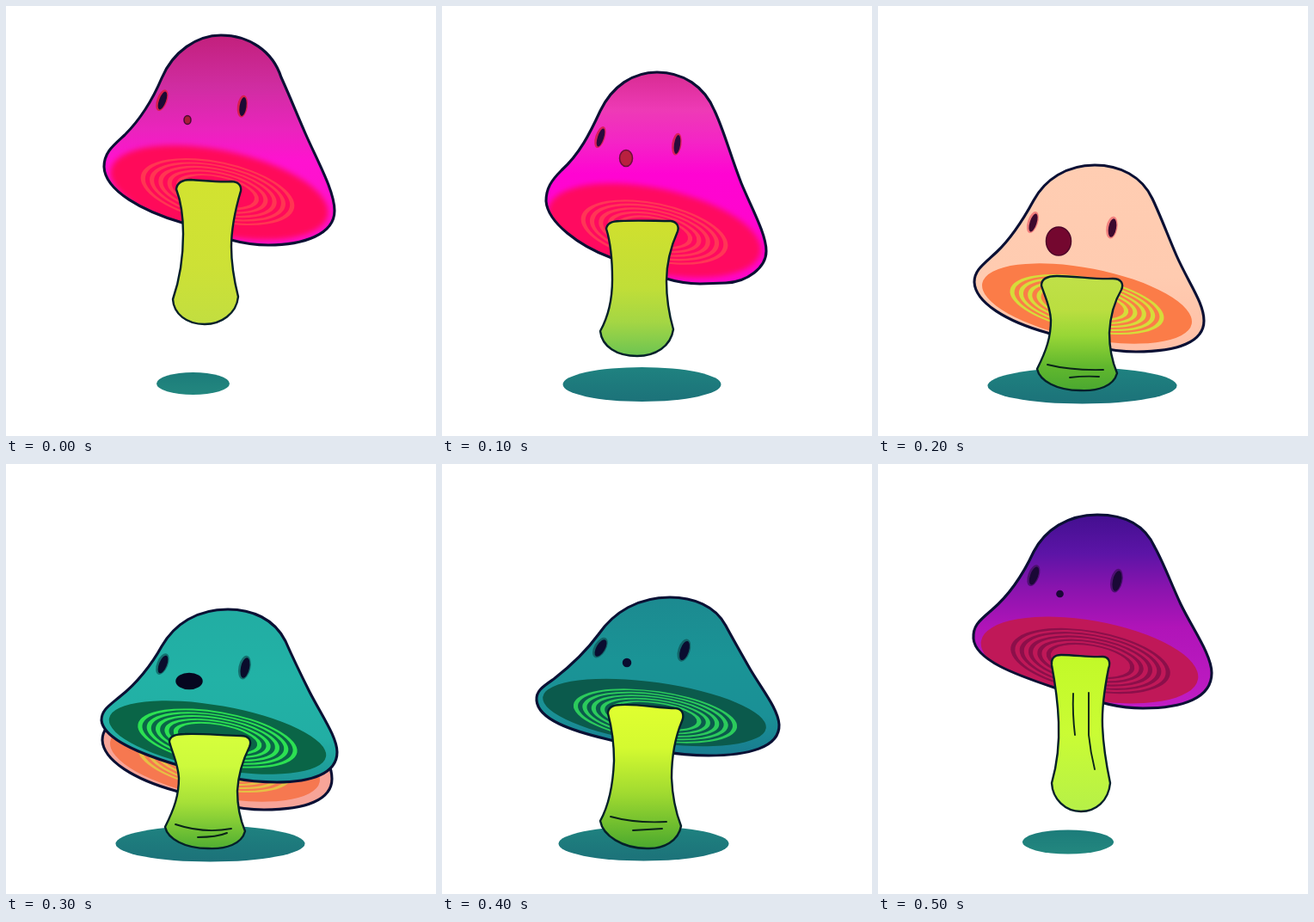
Animation, 500 px wide and 500 px high, one loop 0.6 s. Source, as an HTML page:

```html
<!DOCTYPE html>
<html lang="en">
<head>
<meta charset="utf-8">
<title>Bouncing mushroom</title>
<style>
html, body { margin: 0; width: 100%; height: 100%; overflow: hidden; background: #fff; }
svg { display: block; width: 100vw; height: 100vh; }
.pose { visibility: hidden; animation: show 600ms step-end infinite; animation-delay: calc(var(--i) * 100ms - 600ms); }
@keyframes show {
  0% { visibility: visible; }
  16.6667%, 100% { visibility: hidden; }
}
.line { fill: none; stroke: #0a1034; stroke-linejoin: round; stroke-linecap: round; }
.soft { filter: blur(3px); }
</style>
</head>
<body>
<svg id="stage" viewBox="0 0 500 500">
  <defs>
    <linearGradient id="ground" x1="0" y1="0" x2="0" y2="1">
      <stop offset="0" stop-color="#1c7c7a"/>
      <stop offset="1" stop-color="#23877f"/>
    </linearGradient>
    <linearGradient id="groundWide" x1="0" y1="0" x2="0" y2="1">
      <stop offset="0" stop-color="#1f8280"/>
      <stop offset="1" stop-color="#1c7279"/>
    </linearGradient>
  </defs>
</svg>
<script>
// eye: [x, y, rx, ry, tilt]; mouth: [x, y, rx, ry]; gill: [x, y, rx, ry, tilt]; rings: [x, y, rx, ry]
const poses = [
  {
    cap: 'M250 34C222 34 194 53 181 84C170 110 155 133 138 150C125 162 114 170 114 187C115 215 160 239 205 252C245 267 270 278 305 278C345 278 382 266 382 238C382 215 362 180 348 148C335 118 330 105 320 83C310 52 282 34 250 34Z',
    skin: ['#c2207c', '#d02da2 25%', '#ea24bd 45%', '#ff12d0 60%', '#ff10c8'],
    gill: [248, 217, 129, 49, 12], soft: true, under: '#ff0a5a',
    rings: [246, 216, 91, 35], ring: '#ff3652',
    eyes: [[182, 110, 4, 11, 20], [275.5, 117, 4, 11, 8]], halo: '#d81f4c', pupil: '#1b0a34',
    mouth: [211, 132.5, 4, 5], lips: '#a81c38', lipLine: '#4a0c34',
    stem: 'M198 213C199 205 206 202 215 202C232 203 248 205 262 204C270 204 274 209 273 215C268 232 262 255 262 280C262 302 266 322 270 338C268 358 250 370 231 370C210 370 195 358 194 341C203 315 206 290 206 265C206 245 203 226 198 213Z',
    flesh: ['#d2e330', '#cde136 60%', '#c2de40'],
    shadow: [217.5, 439, 42.5, 13]
  },
  {
    cap: 'M250 77C222 77 198 93 184 122C172 148 160 172 139 191C127 203 121 212 121 227C123 252 160 279 195 292C235 308 265 323 300 323L330 322C355 321 377 304 377 285C377 265 360 235 348 206C335 173 328 145 317 122C305 93 280 77 250 77Z',
    skin: ['#d82c92', '#ee3ab6 18%', '#f424c6 33%', '#ff04d2 48%', '#ff06c8'],
    gill: [247, 261, 126, 49, 12], soft: true, under: '#ff0a60',
    rings: [247, 263, 87, 34], ring: '#ff3656',
    eyes: [[184.5, 153, 3.6, 11, 18], [273.5, 161, 3.6, 11, 8]], halo: '#d81f58', pupil: '#2a0a3c',
    mouth: [214, 177, 7.5, 9.5], lips: '#b9203f', lipLine: '#6a1038',
    stem: 'M191 259C192 252 198 250 207 250C228 249 248 250 266 250C273 251 276 256 274 262C266 280 261 300 261 320C261 342 265 362 269 376C266 396 248 407 227 407C203 407 186 396 184 378C194 360 198 340 198 318C198 295 196 275 191 259Z',
    flesh: ['#d0e02e', '#c0de38 50%', '#a4d644 75%', '#6cc452'],
    shadow: [232.5, 440, 92, 20], wide: true
  },
  {
    cap: 'M252 185C219 185 194 202 181 226C169 248 155 270 138 286C123 300 112 307 112 321C113 345 150 367 197 380C235 392 265 402 300 402C350 402 379 390 379 366C379 345 361 322 347 290C337 267 329 245 319 224C307 198 281 185 252 185Z',
    skin: ['#ffcdb2', '#ffcbb0 60%', '#ffbfa6'],
    gill: [243, 346, 124, 41, 11], under: '#fb7c48',
    rings: [243, 347, 91, 31], ring: '#d6dc3a',
    eyes: [[180.5, 252, 4, 11, 18], [272.5, 258, 4.5, 11, 10]], halo: '#f2807e', pupil: '#3c0a2e',
    mouth: [210, 273.5, 14.5, 16.5], lips: '#74072f', lipLine: '#4e0428',
    stem: 'M190 325C190 317 198 314 208 314C230 314 252 318 273 317C283 317 286 323 283 330C274 345 270 362 269 380C269 400 273 415 278 427C274 442 256 448 235 447C208 447 188 436 185 422C196 400 201 385 201 365C200 348 194 338 190 325Z',
    flesh: ['#c0e048', '#bade40 30%', '#98d636 52%', '#62b82e 78%', '#4aa830'],
    folds: 'M197 417Q225 424 262 423M223 432Q240 430 257 431',
    shadow: [237.5, 441.5, 110, 21], wide: true
  },
  {
    cap: 'M258 169C222 169 196 186 181 212C169 234 151 256 133 270C120 281 111 286 111 298C113 318 150 335 196 349C235 361 275 370 315 370C355 370 385 360 385 335C385 318 368 294 353 265C342 243 332 222 325 206C312 180 286 169 258 169Z',
    skin: ['#22ada3', '#22b2a6 40%', '#22aea4 75%', '#1c9696'],
    gill: [246, 318, 128, 37, 10], under: '#0a6547',
    rings: [246, 319, 94, 31], ring: '#2ce052',
    eyes: [[182.5, 233, 4.5, 11, 22], [278, 237, 5, 12, 12]], halo: '#14706f', pupil: '#0a0c2c',
    mouth: [213, 252.5, 15, 9], lips: '#06061f', lipLine: '#06061f',
    stem: 'M190 323C190 316 198 314 208 314C230 313 252 316 273 316C283 316 286 322 283 329C275 345 270 362 269 380C269 400 273 415 278 427C274 442 256 448 235 447C208 447 188 436 185 422C196 400 201 385 201 365C200 348 194 338 190 323Z',
    flesh: ['#d6ff3c', '#cdfa3c 28%', '#a6e038 60%', '#50ae32'],
    folds: 'M197 419Q230 430 262 424M223 434Q245 434 257 429',
    shadow: [237.5, 441.5, 110, 21], wide: true, trail: 2
  },
  {
    cap: 'M265 155C228 155 200 172 182 198C166 220 148 236 130 250C117 259 109 264 110 275C112 297 150 310 192 320C235 331 270 339 310 339C355 339 393 330 392 303C391 285 372 262 358 238C346 217 338 203 330 188C318 165 292 155 265 155Z',
    skin: ['#1c8a90', '#1a9496 40%', '#1a9096 75%', '#187c90'],
    gill: [247, 289, 131, 35, 8], under: '#0b5a4c',
    rings: [248, 293, 96, 29], ring: '#2bca5c',
    eyes: [[184.5, 214, 5, 11, 30], [282, 217, 5, 11.5, 18]], halo: '#126468', pupil: '#0a0c30',
    mouth: [215, 231, 4.5, 4.5], lips: '#0a0c30', lipLine: '#0a0c30',
    stem: 'M193 290C193 282 200 280 208 280C230 279 252 284 272 284C280 285 282 292 279 299C271 318 267 342 267 365C268 390 273 408 278 421C275 438 258 448 238 447C210 447 187 432 184 415C195 395 199 370 200 345C200 322 197 305 193 290Z',
    flesh: ['#e0ff30', '#d4fa30 30%', '#a0da30 62%', '#4aa82e'],
    folds: 'M196 410Q225 418 261 416M222 426L256 424',
    shadow: [234.5, 441.5, 99, 20], wide: true
  },
  {
    cap: 'M255 59C220 59 194 77 181 102C168 130 152 153 132 170C118 182 110 188 111 203C113 228 160 245 205 260C245 272 270 284 308 284C355 284 388 272 388 243C388 222 366 192 352 163C340 137 332 115 322 97C310 70 285 59 255 59Z',
    skin: ['#430f90', '#5c14a6 20%', '#8a14ae 38%', '#b014b8 58%', '#c01cc4'],
    gill: [246, 228, 128, 46, 10], under: '#c01858',
    rings: [247, 229, 94, 35], ring: '#8c0f4a',
    eyes: [[181.5, 130, 4.5, 11, 20], [278, 136, 5, 12, 12]], halo: '#4c1070', pupil: '#1a0836',
    mouth: [211.5, 151, 3.6, 3.6], lips: '#1a0836', lipLine: '#1a0836',
    stem: 'M202 234C201 225 206 222 213 222C230 222 246 225 261 224C268 224 271 230 268 238C264 258 260 280 261 305C262 330 266 352 270 371C268 392 253 404 236 404C218 404 203 390 202 371C208 350 211 325 210 300C209 275 206 255 202 234Z',
    flesh: ['#c2f928', '#cafc34 50%', '#b6f048'],
    folds: 'M227 267Q226 290 229 315M245 266L245 315Q247 335 252 355',
    shadow: [221, 439.5, 53, 14]
  }
];

const ellipse = ([x, y, rx, ry, tilt = 0], attrs) =>
  `<ellipse cx="${x}" cy="${y}" rx="${rx}" ry="${ry}" transform="rotate(${tilt} ${x} ${y})" ${attrs}/>`;

const gradient = (id, stops) =>
  `<linearGradient id="${id}" x1="0" y1="0" x2="0" y2="1">${stops.map((stop, k) => {
    const [color, at = k ? '100%' : '0%'] = stop.split(' ');
    return `<stop offset="${at}" stop-color="${color}"/>`;
  }).join('')}</linearGradient>`;

// Flattened circles, so the strokes swell at the sides and thin out above and below.
const rings = ([x, y, rx, ry], tilt, color) =>
  `<g transform="translate(${x} ${y}) rotate(${tilt}) scale(1 ${ry / rx})" fill="none" stroke="${color}" stroke-width="5.2">
    ${[0, 1, 2, 3, 4].map(k => `<circle r="${rx - 2.6 - k * 10.5}"/>`).join('')}
  </g>`;

const capOf = (p, id, skin = `url(#skin${id})`, under = p.under, ring = p.ring) => `
  <path d="${p.cap}" fill="${skin}"/>
  <g clip-path="url(#clip${id})">
    ${ellipse(p.gill, `fill="${under}" ${p.soft ? 'class="soft"' : ''}`)}
    ${rings(p.rings, p.gill[4], ring)}
  </g>
  <path d="${p.cap}" class="line" stroke-width="3.1"/>`;

const eyeOf = (eye, p) => {
  const [x, y, rx, ry, tilt] = eye;
  return ellipse([x - .6, y - .4, rx + 2, ry + 2, tilt], `fill="${p.halo}"`) +
    ellipse(eye, `fill="${p.pupil}"`);
};

const draw = (p, i) => `
  <defs>
    ${gradient('skin' + i, p.skin)}
    ${gradient('flesh' + i, p.flesh)}
    <clipPath id="clip${i}"><path d="${p.cap}"/></clipPath>
  </defs>
  <g class="pose" style="--i:${i}">
    ${ellipse(p.shadow, `fill="url(#${p.wide ? 'groundWide' : 'ground'})"`)}
    ${p.trail ? capOf(poses[p.trail], p.trail, '#f7a498', '#f67850', '#e6c044') : ''}
    ${capOf(p, i)}
    ${p.eyes.map(eye => eyeOf(eye, p)).join('')}
    ${ellipse(p.mouth, `fill="${p.lips}" stroke="${p.lipLine}" stroke-width="1.5"`)}
    <path d="${p.stem}" fill="url(#flesh${i})"/>
    <path d="${p.stem}" class="line" style="stroke:#04202a" stroke-width="2.4"/>
    ${p.folds ? `<path d="${p.folds}" class="line" style="stroke:#0a2418" stroke-width="1.9"/>` : ''}
  </g>`;

document.getElementById('stage').insertAdjacentHTML('beforeend', poses.map(draw).join(''));
</script>
</body>
</html>
```
